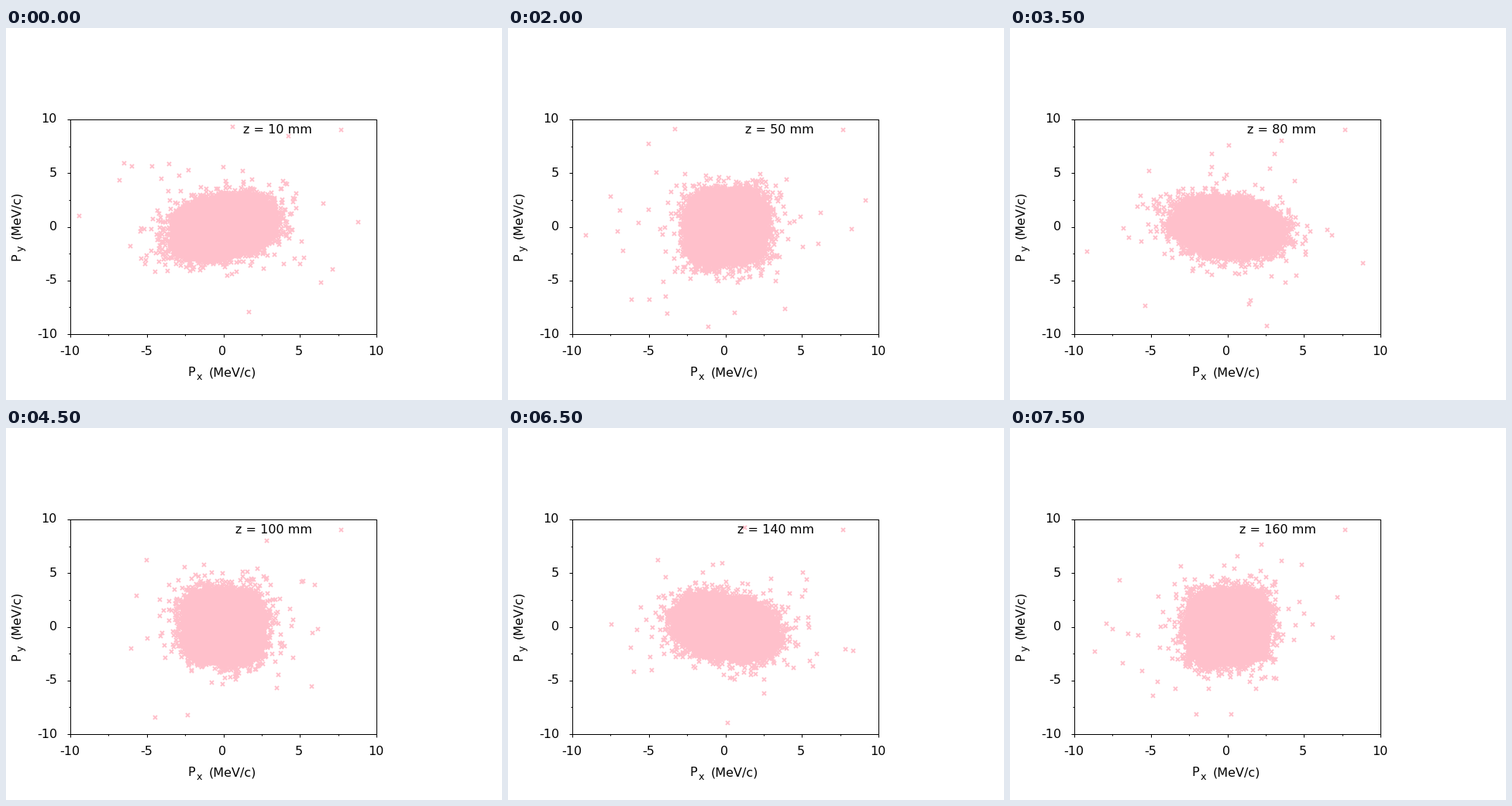
A matplotlib script for the animation above (8 s loop, 640 by 480 pixels).

```python
import numpy as np
import matplotlib.pyplot as plt
from matplotlib.animation import FuncAnimation

W, H, DPI = 640, 480, 80
PT = 72 / DPI  # points per pixel
LEFT, RIGHT, TOP, BOTTOM = 83, 478, 118, 395
PINK = "#ffc0cb"
STEPS = 16
KEY = (7.67, 9.05)  # legend marker, in axis units

plt.rcParams["font.family"] = "DejaVu Sans"
fig = plt.figure(figsize=(W / DPI, H / DPI), dpi=DPI, facecolor="white")
ax = fig.add_axes([LEFT / W, 1 - BOTTOM / H,
                   (RIGHT - LEFT) / W, (BOTTOM - TOP) / H])
ax.set(xlim=(-10, 10), ylim=(-10, 10), facecolor="none")


def label(x, y, s, size=16, **kw):
    """Text with its baseline at pixel (x, y), y counted downwards."""
    return fig.text(x / W, 1 - y / H, s, fontsize=size * PT, color="black",
                    va="baseline", rotation_mode="anchor", **kw)


# Frame, outward ticks and labels
for spine in ax.spines.values():
    spine.set(linewidth=PT, zorder=5)
majors = np.arange(-10, 11, 5)
minors = np.arange(-7.5, 10, 5)
ax.set_xticks(majors, labels=[])
ax.set_yticks(majors, labels=[])
ax.set_xticks(minors, minor=True)
ax.set_yticks(minors, minor=True)
ax.tick_params(which="major", direction="out", length=4 * PT, width=PT)
ax.tick_params(which="minor", direction="out", length=2 * PT, width=PT)

for v in majors:
    part = (v + 10) / 20
    label(LEFT + part * (RIGHT - LEFT) - 1, 422, str(v), ha="center")
    label(66, BOTTOM - part * (BOTTOM - TOP) + 4.5, str(v), ha="right")

for offset, s, size, drop in ((0, "P", 16, 0), (12, "x", 12.8, 5),
                              (28, "(MeV/c)", 16, 0)):
    label(234 + offset, 449 + drop, s, size)
    label(18 + drop, 300.5 - offset, s.replace("x", "y"), size, rotation=90)

title = label(395, 136, "", ha="right")


def polar(r, a):
    return r * np.cos(a), r * np.sin(a)


def beam(z):
    """Momenta of the bunch at z: a core that breathes and tilts, plus strays."""
    rng = np.random.default_rng(z)
    phase = 2 * np.pi * (0.05 + (z - 50) / 55)
    c, s = np.cos(phase), np.sin(phase)

    # superellipse core with an exponential fringe
    r = np.concatenate([0.94 * np.sqrt(rng.random(5000)),
                        0.94 + rng.exponential(0.11, 450)])
    a = rng.uniform(0, 2 * np.pi, r.size)
    power = 3 + 0.9 * c
    r /= (abs(np.cos(a)) ** power + abs(np.sin(a)) ** power) ** (1 / power)
    u, v = polar(r, a)
    px = (3.35 - 0.6 * c) * u
    py = (3.25 + 0.4 * c) * v + 0.75 * s * u

    # strays thin out towards the edge of the plot
    sx, sy = polar(4.2 + 5.6 * rng.random(44) ** 2.2,
                   rng.uniform(0, 2 * np.pi, 44))
    return np.r_[px, sx, KEY[0]], np.r_[py, sy, KEY[1]]


dots, = ax.plot([], [], "x", color=PINK, ms=5 * PT, mew=2 * PT,
                clip_on=False, zorder=2)


def draw(i):
    z = 10 * (i + 1)
    dots.set_data(*beam(z))
    title.set_text(f"z = {z} mm")
    return dots, title


anim = FuncAnimation(fig, draw, frames=STEPS, interval=500,
                     repeat=True, repeat_delay=0, blit=False)
plt.show()
```
